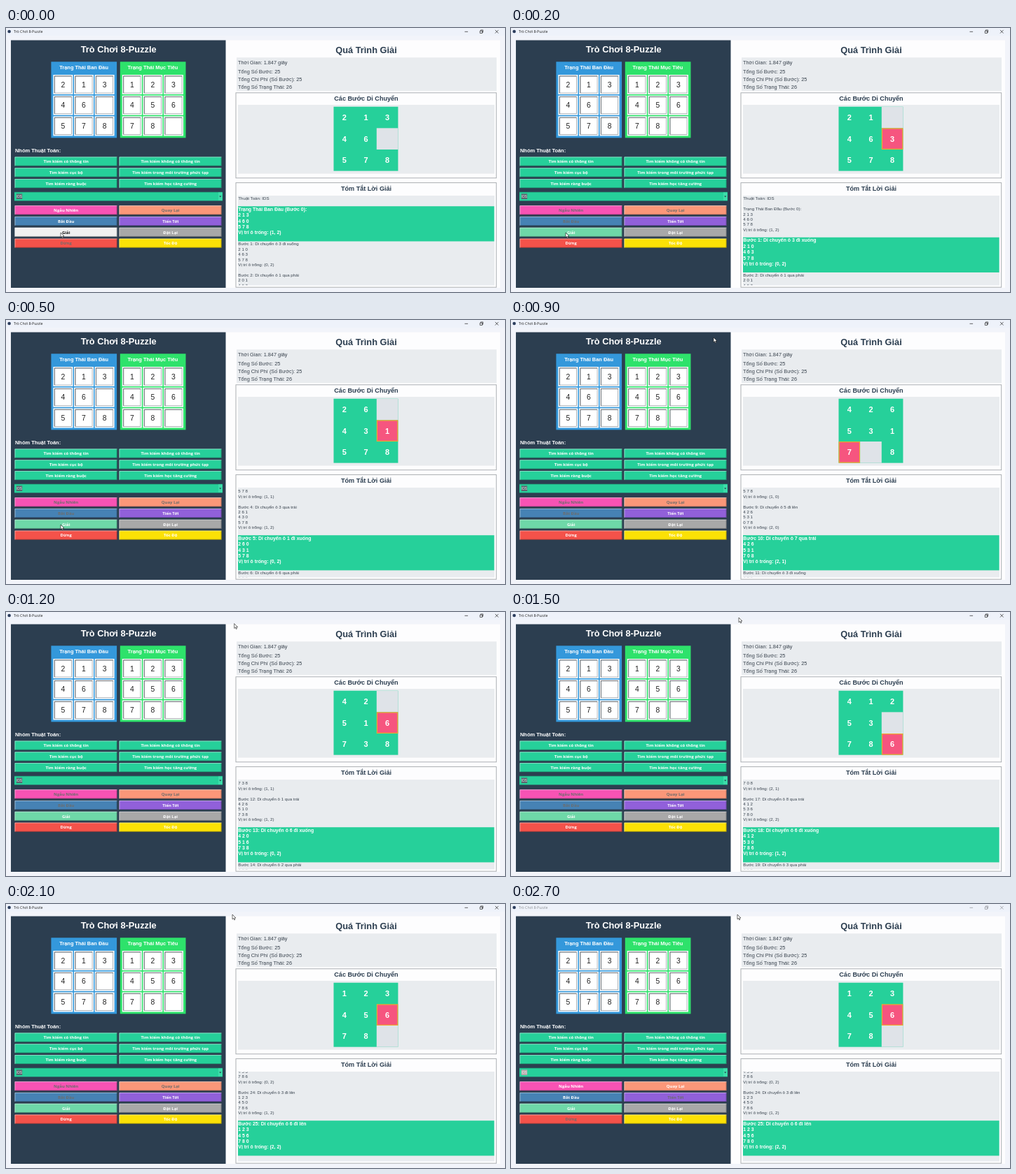
Write an HTML page that moves like this. It is 712x378 px and loops after 2.8 s.

```html
<!DOCTYPE html>
<html lang="vi">
<head>
<meta charset="utf-8">
<title>8-Puzzle</title>
<style>
  html, body { margin: 0; width: 100%; height: 100%; overflow: hidden; background: #f2f4fa; }
  svg { display: block; width: 712px; height: 378px; }
  text { font-family: "Liberation Sans", Arial, sans-serif; white-space: pre; }
  .ui { font-family: "Open Sans", "Noto Sans", sans-serif; }
  .bold { font-weight: 700; }
</style>
</head>
<body>
<svg id="stage" viewBox="0 0 712 378" xmlns="http://www.w3.org/2000/svg">
  <clipPath id="log"><rect x="331" y="240.4" width="366" height="127.8"/></clipPath>
</svg>
<script>
const LOOP = 2800, TICK = 100;
const NAVY = '#2c3e50', GREEN = '#26d09a', PANEL = '#e9ecef', DIM = '#6d6d6d';
const stage = document.getElementById('stage');

function add(parent, tag, attrs, content) {
  const el = document.createElementNS('http://www.w3.org/2000/svg', tag);
  for (const key in attrs) el.setAttribute(key, attrs[key]);
  if (content !== undefined) el.textContent = content;
  parent.appendChild(el);
  return el;
}
const group = attrs => add(stage, 'g', attrs || {});
const rect = (p, x, y, width, height, fill, more) =>
  add(p, 'rect', { x, y, width, height, fill, ...more });
const path = (p, d, stroke, width = 0.8) =>
  add(p, 'path', { d, stroke, fill: 'none', 'stroke-width': width });
// y is the vertical middle of the capitals
const label = (p, s, x, y, size, fill, cls = '', anchor = 'middle') =>
  add(p, 'text', { x, y: y + size * 0.36, 'font-size': size, fill, class: cls, 'text-anchor': anchor }, s);

// ---- puzzle steps: the tile that slides into the gap at each step ----
const START = '213460578';
const MOVES = [...'3163162457316213863541236'];
const steps = [{ board: START, gap: 5 }];
const lines = ['Thuật Toán: IDS', ''];

function logStep(title, { board, gap }) {
  lines.push(title);
  for (let r = 0; r < 9; r += 3) lines.push([...board.slice(r, r + 3)].join(' '));
  lines.push(`Vị trí ô trống: (${Math.floor(gap / 3)}, ${gap % 3})`, '');
}
logStep('Trạng Thái Ban Đầu (Bước 0):', steps[0]);
MOVES.forEach((tile, i) => {
  const { board, gap } = steps[i];
  const from = board.indexOf(tile);
  const cells = [...board];
  cells[gap] = tile;
  cells[from] = '0';
  const way = { 3: 'đi xuống', '-3': 'đi lên', 1: 'qua phải', '-1': 'qua trái' }[gap - from];
  const next = { board: cells.join(''), gap: from, moved: gap };
  steps.push(next);
  logStep(`Bước ${i + 1}: Di chuyển ô ${tile} ${way}`, next);
});

// ---- window ----
rect(stage, 0, 0, 712, 378, '#f2f4fa');
rect(stage, 0, 0, 712, 11, '#eef2fa');
rect(stage, 314, 17.5, 391, 354.5, '#fdfdfe');
rect(stage, 7, 17.5, 306.5, 354.5, NAVY);
const bar = group();
add(bar, 'circle', { cx: 4.6, cy: 5, r: 2.3, fill: '#2b3d5c' });
const caption = label(bar, 'Trò Chơi 8-Puzzle', 11, 5.3, 5.2, '#222', 'ui', 'start');
const controls = path(bar,
  'M654.5 5.3h4.6M676.3 4.2h3.2v3.2h-3.2zM677.4 4v-1.1h3.2v3.3h-1M698 2.9l4.6 4.6M702.6 2.9l-4.6 4.6', '#222', 0.7);

// ---- left side ----
label(stage, 'Trò Chơi 8-Puzzle', 160.7, 30.5, 12.8, '#fff', 'bold');

function miniBoard(x, color, title, board) {
  rect(stage, x, 48.3, 93.7, 109, color);
  label(stage, title, x + 46.7, 56, 7.45, '#fff', 'bold');
  [...board].forEach((n, i) => {
    const cx = x + 17 + (i % 3) * 29.6, cy = 81 + Math.floor(i / 3) * 29.7;
    rect(stage, cx - 14, cy - 14, 28, 28, '#fff');
    rect(stage, cx - 12.1, cy - 12.1, 24.2, 24.2, '#fff', { stroke: '#8d9399', 'stroke-width': 0.7 });
    path(stage, `M${cx - 12.1} ${cy + 12.1}v-24.2h24.2`, '#5a5f66', 0.8);
    if (n !== '0') label(stage, n, cx, cy, 10.4, '#222');
  });
}
miniBoard(64.4, '#3498db', 'Trạng Thái Ban Đầu', START);
miniBoard(162.8, '#2ee26b', 'Trạng Thái Mục Tiêu', '123456780');
label(stage, 'Nhóm Thuật Toán:', 13, 175, 7.45, '#fff', 'bold', 'start');

function button(text, col, y, color) {
  const x = col ? 161.5 : 12.5;
  const face = rect(stage, x, y, 146, 13, color);
  path(stage, `M${x + 0.4} ${y + 13}v-12.6h145.6`, 'rgba(255,255,255,.55)');
  path(stage, `M${x} ${y + 12.6}h145.6v-12.6`, 'rgba(0,0,0,.3)');
  const caption = label(stage, text, x + 73.2, y + 6.7, 5.95, '#fff', 'ui bold');
  return (fill, back) => {
    caption.setAttribute('fill', fill);
    if (back) face.setAttribute('fill', back);
  };
}
[['Tìm kiếm có thông tin', 'Tìm kiếm không có thông tin'],
 ['Tìm kiếm cục bộ', 'Tìm kiếm trong môi trường phức tạp'],
 ['Tìm kiếm ràng buộc', 'Tìm kiếm học tăng cường']]
  .forEach((row, r) => row.forEach((s, c) => button(s, c, 184.5 + r * 15.8, GREEN)));

rect(stage, 12, 234.8, 297, 12.6, GREEN);
path(stage, 'M12 235.2h297', 'rgba(0,0,0,.25)', 0.7);
const picked = rect(stage, 14.8, 237.4, 8.4, 7.6, '#5b6670');
label(stage, 'IDS', 19, 241.2, 5, '#e4eeea');
rect(stage, 303, 235.4, 5.6, 11.4, '#3ddcaa');
add(stage, 'path', { d: 'M304.2 240.4h3.2l-1.6 1.9z', fill: '#234' });

const shuffle = button('Ngẫu Nhiên', 0, 254.2, '#f853b4');
const back = button('Quay Lại', 1, 254.2, '#fb9779');
const start = button('Bắt Đầu', 0, 270, '#4682b4');
const forward = button('Tiến Tới', 1, 270, '#9160da');
const solve = button('Giải', 0, 285.8, '#6ed8a8');
button('Đặt Lại', 1, 285.8, '#a8a8a8');
const halt = button('Dừng', 0, 301.6, '#f4524a');
button('Tốc Độ', 1, 301.6, '#fbe106');

// ---- right side ----
label(stage, 'Quá Trình Giải', 514, 31, 12.8, NAVY, 'bold');
rect(stage, 329, 42.3, 371, 48, PANEL);
[['Thời Gian: 1.847 giây', 49.6], ['Tổng Số Bước: 25', 62], ['Tổng Chi Phí (Số Bước): 25', 73.2],
 ['Tổng Số Trạng Thái: 26', 84.4]]
  .forEach(([s, y]) => label(stage, s, 331, y, 7.35, '#38424d', '', 'start'));

function frame(y, h, title, top, bottom) {
  rect(stage, 328, y, 371.7, h, '#fdfdfe', { stroke: '#a3a7ab', 'stroke-width': 0.9 });
  label(stage, title, 514, y + 8.3, 9.1, NAVY, 'bold');
  rect(stage, 331, top, 366, bottom - top, PANEL);
}
frame(92.8, 122, 'Các Bước Di Chuyển', 110, 208.6);
frame(221.6, 149.6, 'Tóm Tắt Lời Giải', 240, 368.4);

const tiles = group();
const log = group({ 'clip-path': 'url(#log)' });
const cursor = add(stage, 'path', {
  d: 'M0 0V6.8L1.6 5.4L2.7 7.9L3.8 7.4L2.8 5H4.9Z', fill: '#fff', stroke: '#111', 'stroke-width': 0.6
});

function drawTiles({ board, moved }) {
  tiles.replaceChildren();
  const side = 30.65;
  rect(tiles, 467.5, 112.7, side * 3, side * 3, GREEN);
  [...board].forEach((n, i) => {
    const x = 467.5 + (i % 3) * side, y = 112.7 + Math.floor(i / 3) * side;
    if (n === '0') return rect(tiles, x, y, side, side, '#dfe3e8');
    if (i === moved)
      rect(tiles, x + 0.6, y + 0.6, side - 1.2, side - 1.2, '#f6557f', { stroke: '#f0a92c', 'stroke-width': 1.2 });
    label(tiles, n, x + side / 2, y + side / 2, 11, '#fff', 'bold');
  });
}

function drawLog(step) {
  log.replaceChildren();
  const pitch = 7.42, bigPitch = 8.37, first = 2 + step * 6;
  const top = step < 3 ? 240.4 + pitch * first : step < 25 ? 308.2 : 310.2;
  rect(log, 331, top, 365.6, bigPitch * 6, GREEN);
  lines.forEach((s, i) => {
    const k = i - first, big = k >= 0 && k < 6;
    const y = big ? top + (k + 0.5) * bigPitch
      : k < 0 ? top + (k + 0.5) * pitch
      : top + bigPitch * 6 + (k - 5.5) * pitch;
    if (!s || y < 234 || y > 374) return;
    label(log, s, 331.3, y, big ? 6.9 : 6.15, big ? '#fff' : '#38424d', big ? 'bold' : '', 'start');
  });
}

// ---- timeline, one entry per tick ----
const SHOWN = [0, 0, 1, 2, 3, 5, 6, 7, 9, 10, 11, 12, 13, 15, 16, 18, 19, 21, 22, 23, 24, 25];
const PATH = [[0, 78, 293], [6, 78, 293], [8, 250, 70], [9, 289, 25], [11, 322, 17], [12, 325.7, 16.6],
              [15, 325, 8], [18, 323, 15], [28, 323, 15]];

function cursorAt(tick) {
  const i = PATH.findIndex(p => p[0] > tick);
  const [t0, x0, y0] = PATH[i - 1], [t1, x1, y1] = PATH[i];
  const f = (tick - t0) / (t1 - t0);
  return `translate(${x0 + (x1 - x0) * f} ${y0 + (y1 - y0) * f})`;
}

function show(tick) {
  const step = SHOWN[Math.min(tick, SHOWN.length - 1)];
  const idle = tick === 0, done = tick >= 22, away = tick >= 27;
  const on = yes => yes ? '#fff' : DIM;
  drawTiles(steps[step]);
  drawLog(step);
  shuffle(on(idle || done));
  start(on(idle || done));
  back(on(done));
  forward(on(!done));
  halt(on(!idle && !done));
  solve(idle ? '#111' : '#fff', idle ? '#f0f0f0' : '#6ed8a8');
  caption.setAttribute('fill', away ? '#8d9096' : '#222');
  controls.setAttribute('stroke', away ? '#8d9096' : '#222');
  picked.setAttribute('fill', away ? '#b9a9ac' : '#5b6670');
  cursor.setAttribute('transform', cursorAt(tick));
}

let last = -1;
const origin = performance.now();
function run(now) {
  const tick = Math.floor((Math.max(0, now - origin) % LOOP) / TICK);
  if (tick !== last) show(last = tick);
  requestAnimationFrame(run);
}
run(origin);
</script>
</body>
</html>
```
